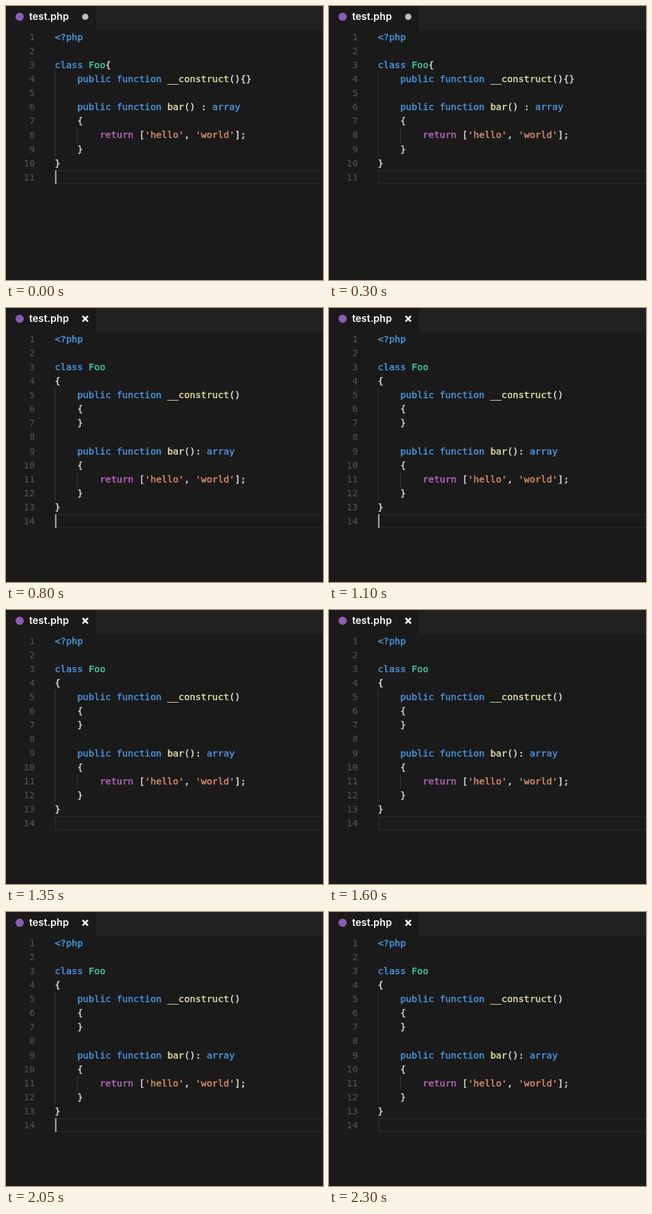
Write an HTML page that moves like this. It is 500x432 px and loops after 2.35 s.

```html
<!DOCTYPE html>
<html lang="en">
<head>
<meta charset="utf-8">
<title>Format on save</title>
<style>
  html, body { margin: 0; width: 100%; height: 100%; overflow: hidden; background: #1a1a1a; }
  svg { display: block; width: 500px; height: 432px; }
  .code text { font: 14.73px "DejaVu Sans Mono", monospace; white-space: pre; }
  .code .token { stroke-width: .5px; }
  .title { font: 600 15.6px Inter, sans-serif; fill: #fff; }
</style>
</head>
<body>
<svg viewBox="0 0 500 432">
  <rect width="500" height="432" fill="#1a1a1a"/>
  <rect x="142" width="358" height="38" fill="#212121"/>
  <circle cx="21.5" cy="17" r="6.5" fill="#8c5bb5"/>
  <text class="title" x="36.5" y="22">test.php</text>
  <circle id="dot" cx="125" cy="17" r="5" fill="#bcbcbc"/>
  <path id="cross" d="M120.8 12.8l8.4 8.4m0-8.4l-8.4 8.4" stroke="#fff" stroke-width="2.7"/>
  <g id="before" class="code"></g>
  <g id="after" class="code"></g>
  <rect id="caret" x="77.5" width="2" height="22" fill="#b8b8b8"/>
</svg>
<script>
const LOOP = 2350, CARET_OFF = 300, SAVED = 350, FORMATTED = 700, BLINK = 500;
const LEFT = 77, CHAR = 8.87, LINE = 22.1, TOP = 38;
const COLORS = {
  b: '#4a93dc', g: '#40c69c', y: '#dcdca4', o: '#d38a6c',
  p: '#b765bd', w: '#d8d8d8', n: '#565656'
};
const $ = id => document.getElementById(id);

function add(parent, tag, attrs, text) {
  const el = document.createElementNS('http://www.w3.org/2000/svg', tag);
  for (const key in attrs) el.setAttribute(key, attrs[key]);
  if (text) el.textContent = text;
  parent.appendChild(el);
}

const lineTop = n => TOP + (n - 1) * LINE;

function guide(group, col, first, last) {
  const y = Math.round(lineTop(first));
  add(group, 'rect', {
    x: Math.round(LEFT + col * CHAR), y, width: 1,
    height: Math.round(lineTop(last + 1)) - y, fill: '#3c3c3c'
  });
}

// Each line is an indent followed by [colour, text] pairs.
function draw(group, lines, outer, inner) {
  add(group, 'rect', {
    x: LEFT + 1, y: Math.round(lineTop(lines.length)) + 1, width: 430, height: 20,
    fill: 'none', stroke: '#252525', 'stroke-width': 2
  });
  guide(group, 0, ...outer);
  guide(group, 4, inner, inner);
  lines.forEach(([indent = 0, ...tokens], i) => {
    const y = Math.round(lineTop(i + 1) + 15.7);
    add(group, 'text', { x: 45.5, y, 'text-anchor': 'end', fill: COLORS.n }, String(i + 1));
    let col = indent;
    for (const [key, text] of tokens) {
      const color = COLORS[key];
      add(group, 'text', { class: 'token', x: LEFT + col * CHAR, y, fill: color, stroke: color }, text);
      col += text.length;
    }
  });
}

const open = ['w', '{'], close = ['w', '}'];
const method = (name, ...rest) => [4, ['b', 'public function '], ['y', name], ...rest];
const php = [0, ['b', '<?php']];
const cls = [0, ['b', 'class '], ['g', 'Foo']];
const body = [
  [4, open],
  [8, ['p', 'return '], ['w', '['], ['o', "'hello'"], ['w', ', '], ['o', "'world'"], ['w', '];']],
  [4, close],
  [0, close],
  []
];

draw($('before'), [
  php, [], [...cls, open],
  method('__construct', ['w', '(){}']), [],
  method('bar', ['w', '() : '], ['b', 'array']),
  ...body
], [4, 9], 8);

draw($('after'), [
  php, [], cls, [0, open],
  method('__construct', ['w', '()']), [4, open], [4, close], [],
  method('bar', ['w', '(): '], ['b', 'array']),
  ...body
], [5, 12], 11);

const show = (id, on) => $(id).setAttribute('visibility', on ? 'visible' : 'hidden');

function render(now) {
  const t = now % LOOP;
  const formatted = t >= FORMATTED;
  show('dot', t < SAVED);
  show('cross', t >= SAVED);
  show('before', !formatted);
  show('after', formatted);
  $('caret').setAttribute('y', Math.round(lineTop(formatted ? 14 : 11)));
  show('caret', formatted ? Math.floor((t - FORMATTED) / BLINK) % 2 === 0 : t < CARET_OFF);
}

function tick() {
  render(performance.now());
  requestAnimationFrame(tick);
}
tick();
</script>
</body>
</html>
```
